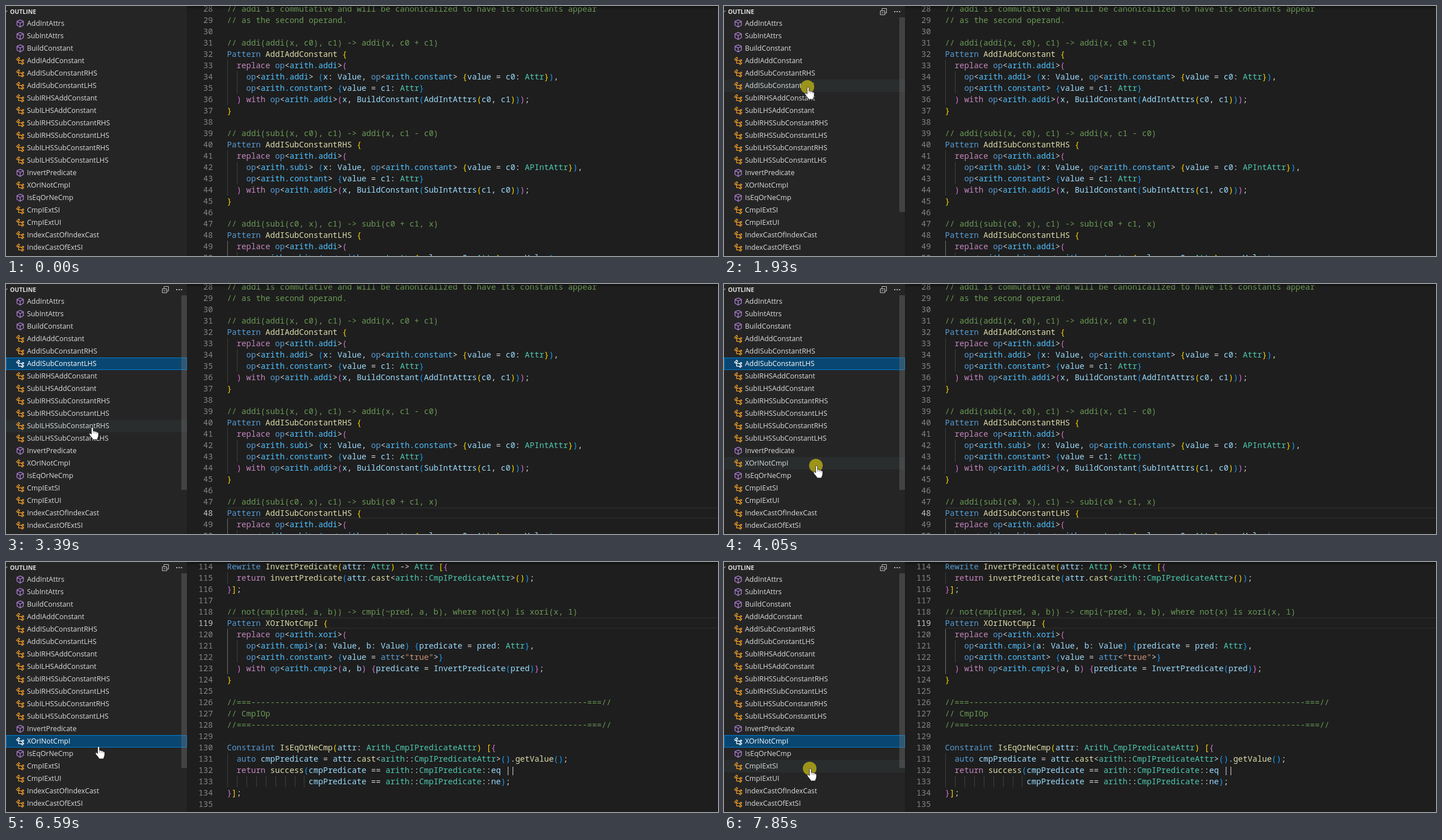
Write an HTML page that moves like this. It is 1255 px wide and 442 px high and loops after 7990 ms.

```html
<!DOCTYPE html>
<html lang="en">
<head>
<meta charset="utf-8">
<title>Outline navigation</title>
<style>
html, body { margin: 0; width: 100%; height: 100%; overflow: hidden; background: #1e1e1e; }
#stage { position: absolute; inset: 0; overflow: hidden; }
#side { position: absolute; left: 0; top: 0; width: 319px; height: 100%; overflow: hidden;
  background: #252526; color: #dedede; font: 12.35px/22px "Open Sans", sans-serif; }
#head { position: absolute; left: 7px; top: -1px; font-size: 10.5px; font-weight: 700; }
#side svg { position: absolute; fill: none; stroke: currentColor; }
.row { position: absolute; left: 0; width: 319px; height: 22px; box-sizing: border-box; white-space: pre; }
.row span { position: absolute; left: 37px; top: 0; }
.row svg { left: 17px; top: 3px; width: 16px; height: 16px; stroke-width: 1.3; }
.method { color: #b180d7; }
.class { color: #ee9d28; }
.row.hover { background: #2a2d2e; }
.row.on { background: #094771; box-shadow: inset 0 0 0 1px #007fd4; }
.row.on span, .row.on svg { color: #fff; }
#bar { position: absolute; left: 309px; top: 20px; width: 10px; height: 344px; background: rgba(121,121,121,.35); }
#editor { position: absolute; left: 319px; top: 0; right: 0; height: 100%; overflow: hidden; }
#editor::after { content: ""; position: absolute; inset: 0; box-shadow: inset 0 6px 6px -6px #000; }
.pane { position: absolute; left: 0; width: 100%; color: #d4d4d4; font: 14.11px/20px "Noto Sans Mono", monospace; }
.line { position: relative; height: 20px; white-space: pre; }
.line code { position: absolute; left: 70.6px; font: inherit; }
.line b { position: absolute; right: calc(100% - 45.6px); font-weight: 400; color: #858585; }
.line i { position: absolute; top: 0; width: 1px; height: 20px; background: #404040; }
.line.in i:first-child { background: #707070; }
.line.now::before { content: ""; position: absolute; left: 71px; right: 0; top: 0; height: 16px;
  border: solid #282828; border-width: 2px 0; }
.line.now b { color: #c6c6c6; }
#top { position: absolute; left: 0; top: 0; width: 100%; height: 100%; }
</style>
</head>
<body>
<div id="stage">
  <div id="side">
    <div id="rows"></div>
    <svg width="10" height="20" style="left:0;top:0"><path d="M-3 12.2L-1.6 12.2L2.4 8"/></svg>
    <div id="head">OUTLINE</div>
    <div id="tools">
      <svg width="60" height="20" style="left:265px;top:0;color:#c5c5c5">
        <path d="M10.5 8.5h8v7h-8zM13.5 8V4.5h8v8H19M12.5 12h4"/>
        <path d="M35 10h2M39.2 10h2M43.4 10h2" stroke-width="2"/>
      </svg>
      <div id="bar"></div>
    </div>
  </div>
  <div id="editor"></div>
  <svg id="top">
    <circle id="press" r="12" fill="#9c9419"/>
    <g id="hand">
      <path transform="translate(-5)" fill="#fff" stroke="#111" stroke-width=".8" d="M4.6 1.6C4.6-.2 7.8-.2 7.8 1.6V7.4C9 6.7 10.6 7.1 10.9 8.1
        12.2 7.5 13.7 8 14 9.1 15.5 8.6 17 9.5 17 11V15C17 17.5 15.3 19 15 22H7.2C6.5 19.5 2.4 15.8.8 13 0 11 2.2 10.2 3.5 11.6L4.6 12.8Z"/>
      <path d="M2.8 8v3M5.9 8.5v3M9 9.5v2.5" stroke="#555" stroke-width=".7"/>
    </g>
    <path id="beam" d="M-3-8.5H-1L0-7.5 1-8.5H3M0-7.5V7.5M-3 8.5H-1L0 7.5 1 8.5H3" fill="none" stroke="#ccc"/>
  </svg>
</div>
<script>
const LOOP = 7990, SIDE = 319, ADVANCE = 8.466;
const $ = id => document.getElementById(id);

const ICONS = {
  method: 'M8 1.6L13.6 4.2V11L8 14.3 2.4 11V4.2ZM2.4 4.3L8 7.3 13.6 4.3M8 7.3V14.3',
  class: 'M1.6 5.35L5.35 1.6 7.1 3.35 3.35 7.1ZM5.35 5.2V12.35H10.6M5.35 7.35H10.6' +
    'M10.3 8.3L13 5.6 14.4 7 11.7 9.7ZM10.3 13.3L13 10.6 14.4 12 11.7 14.7Z'
};
const METHODS = /^(AddInt|SubInt|Build|Invert|IsEq)/;
const symbols = `AddIntAttrs SubIntAttrs BuildConstant AddIAddConstant AddISubConstantRHS
  AddISubConstantLHS SubIRHSAddConstant SubILHSAddConstant SubIRHSSubConstantRHS
  SubIRHSSubConstantLHS SubILHSSubConstantRHS SubILHSSubConstantLHS InvertPredicate
  XOrINotCmpI IsEqOrNeCmp CmpIExtSI CmpIExtUI IndexCastOfIndexCast IndexCastOfExtSI`.split(/\s+/);

$('rows').innerHTML = symbols.map((name, i) => {
  const kind = METHODS.test(name) ? 'method' : 'class';
  return `<div class="row" style="top:${20 + 22 * i}px"><svg class="${kind}" viewBox="0 0 16 16">` +
    `<path d="${ICONS[kind]}"/></svg><span>${name}</span></div>`;
}).join('');
const rows = [...document.querySelectorAll('.row')];

const rule = '//===' + '-'.repeat(70) + '===//';
const arithCode = `// addi is commutative and will be canonicalized to have its constants appear
// as the second operand.

// addi(addi(x, c0), c1) -> addi(x, c0 + c1)
Pattern AddIAddConstant {
  replace op<arith.addi>(
    op<arith.addi> (x: Value, op<arith.constant> {value = c0: Attr}),
    op<arith.constant> {value = c1: Attr}
  ) with op<arith.addi>(x, BuildConstant(AddIntAttrs(c0, c1)));
}

// addi(subi(x, c0), c1) -> addi(x, c1 - c0)
Pattern AddISubConstantRHS {
  replace op<arith.addi>(
    op<arith.subi> (x: Value, op<arith.constant> {value = c0: APIntAttr}),
    op<arith.constant> {value = c1: Attr}
  ) with op<arith.addi>(x, BuildConstant(SubIntAttrs(c1, c0)));
}

// addi(subi(c0, x), c1) -> subi(c0 + c1, x)
Pattern AddISubConstantLHS {
  replace op<arith.addi>(
    op<arith.subi> (op<arith.constant> {value = c0: Attr}, x: Value),`;
const cmpCode = `Rewrite InvertPredicate(attr: Attr) -> Attr [{
  return invertPredicate(attr.cast<arith::CmpIPredicateAttr>());
}];

// not(cmpi(pred, a, b)) -> cmpi(~pred, a, b), where not(x) is xori(x, 1)
Pattern XOrINotCmpI {
  replace op<arith.xori>(
    op<arith.cmpi>(a: Value, b: Value) {predicate = pred: Attr},
    op<arith.constant> {value = attr<"true">}
  ) with op<arith.cmpi>(a, b) {predicate = InvertPredicate(pred)};
}

${rule}
// CmpIOp
${rule}

Constraint IsEqOrNeCmp(attr: Arith_CmpIPredicateAttr) [{
  auto cmpPredicate = attr.cast<arith::CmpIPredicateAttr>().getValue();
  return success(cmpPredicate == arith::CmpIPredicate::eq ||
                 cmpPredicate == arith::CmpIPredicate::ne);
}];
`;

const BRACKETS = ['#ffd700', '#da70d6', '#179fff'];
const STYLES = [
  [/^\/\//, '#6a9955'],
  [/^"/, '#ce9178'],
  [/^(Pattern|Rewrite|Constraint|op|auto)$/, '#569cd6'],
  [/^(replace|with|return)$/, '#c586c0'],
  [/^arith\./, '#4fc1ff'],
  [/^(invertPredicate|cast|getValue|success)$/, '#dcdcaa'],
  [/^(arith|CmpIPredicate|\w*Attr)$/, '#4ec9b0'],
  [/^\w/, '#9cdcfe']
];
const TOKEN = /\/\/.*|"[^"]*"|arith\.\w+|[A-Za-z_]\w*|[()[\]{}]|[^\w()[\]{}"/]+/g;
const escape = s => s.replace(/&/g, '&amp;').replace(/</g, '&lt;');
const paint = (s, color) => `<span style="color:${color}">${escape(s)}</span>`;

function highlight(text) {
  let depth = 0;
  return text.split('\n').map(line => line.replace(TOKEN, (s, at) => {
    if (/^[([{]$/.test(s)) return paint(s, BRACKETS[depth++ % 3]);
    if (/^[)\]}]$/.test(s)) return paint(s, BRACKETS[--depth % 3]);
    if (/^(Pattern|Rewrite|Constraint) $/.test(line.slice(0, at))) return paint(s, '#dcdcaa');
    if (s === 'attr' && line[at + 4] === '<') return paint(s, '#569cd6');
    const style = STYLES.find(([test]) => test.test(s));
    return style ? paint(s, style[1]) : escape(s);
  }));
}

function makePane(text, first, top, block) {
  const source = text.split('\n'), pane = document.createElement('div');
  pane.className = 'pane';
  pane.style.top = top + 'px';
  pane.innerHTML = highlight(text).map((html, i) => {
    const n = first + i, indent = source[i].search(/\S|$/);
    let guides = '';
    for (let c = 0; c < indent; c += 2) guides += `<i style="left:${Math.round(71 + c * ADVANCE)}px"></i>`;
    const active = n > block && n < block + 5 ? ' in' : '';
    return `<div class="line${active}">${guides}<b>${n}</b><code>${html}</code></div>`;
  }).join('');
  $('editor').append(pane);
  return pane;
}
const arithPane = makePane(arithCode, 28, -5, 48);
const cmpPane = makePane(cmpCode, 114, -2, 119);
cmpPane.children[5].classList.add('now');

// Pointer moves: start, end, steps, target x, target y, ease-out power
const MOVES = [
  [180, 930, 12, 385, 221, 1.3],
  [990, 1590, 10, 147, 143, 2],
  [2910, 3060, 3, 147, 232, 2.6],
  [3320, 3720, 6, 162, 321, 1.5],
  [6590, 6920, 6, 157, 377, .5],
  [7250, 7390, 3, 151, 365, 1.5]
];
// Mouse presses: start, end, outline row chosen on release
const CLICKS = [[1860, 2060, 5], [4050, 4250, 13], [7850, 8050, 15]];

function pointer(t, lag) {
  let x = 1075, y = 422;
  for (const [start, end, steps, tx, ty, power] of MOVES) {
    if (t < start) break;
    const done = Math.floor((t - start) / (end - start) * (steps - 1) + .1) + 1;
    const s = done >= steps ? 1 : (done - lag) / steps;
    const e = 1 - (1 - s) ** power;
    x += (tx - x) * e;
    y += (ty - y) * e;
  }
  return [Math.round(x), Math.round(y)];
}

const show = (el, on) => { el.style.display = on ? '' : 'none'; };

function draw(t) {
  const [x, y] = pointer(t, 0), over = x < SIDE;
  const hovered = over ? Math.floor((pointer(t, .5)[1] - 20) / 22) : -1;
  const past = CLICKS.filter(c => t >= c[1]);
  const chosen = past.length ? past[past.length - 1][2] : -1;
  rows.forEach((row, i) => {
    row.classList.toggle('hover', i === hovered);
    row.classList.toggle('on', i === chosen);
  });
  show($('tools'), over);
  show(arithPane, chosen !== 13);
  show(cmpPane, chosen === 13);
  arithPane.children[20].classList.toggle('now', chosen === 5);
  show($('hand'), over);
  show($('beam'), !over && t >= 180);
  show($('press'), CLICKS.some(c => t >= c[0] && t < c[1]));
  for (const id of ['hand', 'beam', 'press']) $(id).setAttribute('transform', `translate(${x} ${y})`);
}

const origin = performance.now();
function tick() {
  draw((performance.now() - origin) % LOOP);
  requestAnimationFrame(tick);
}
tick();
</script>
</body>
</html>
```
